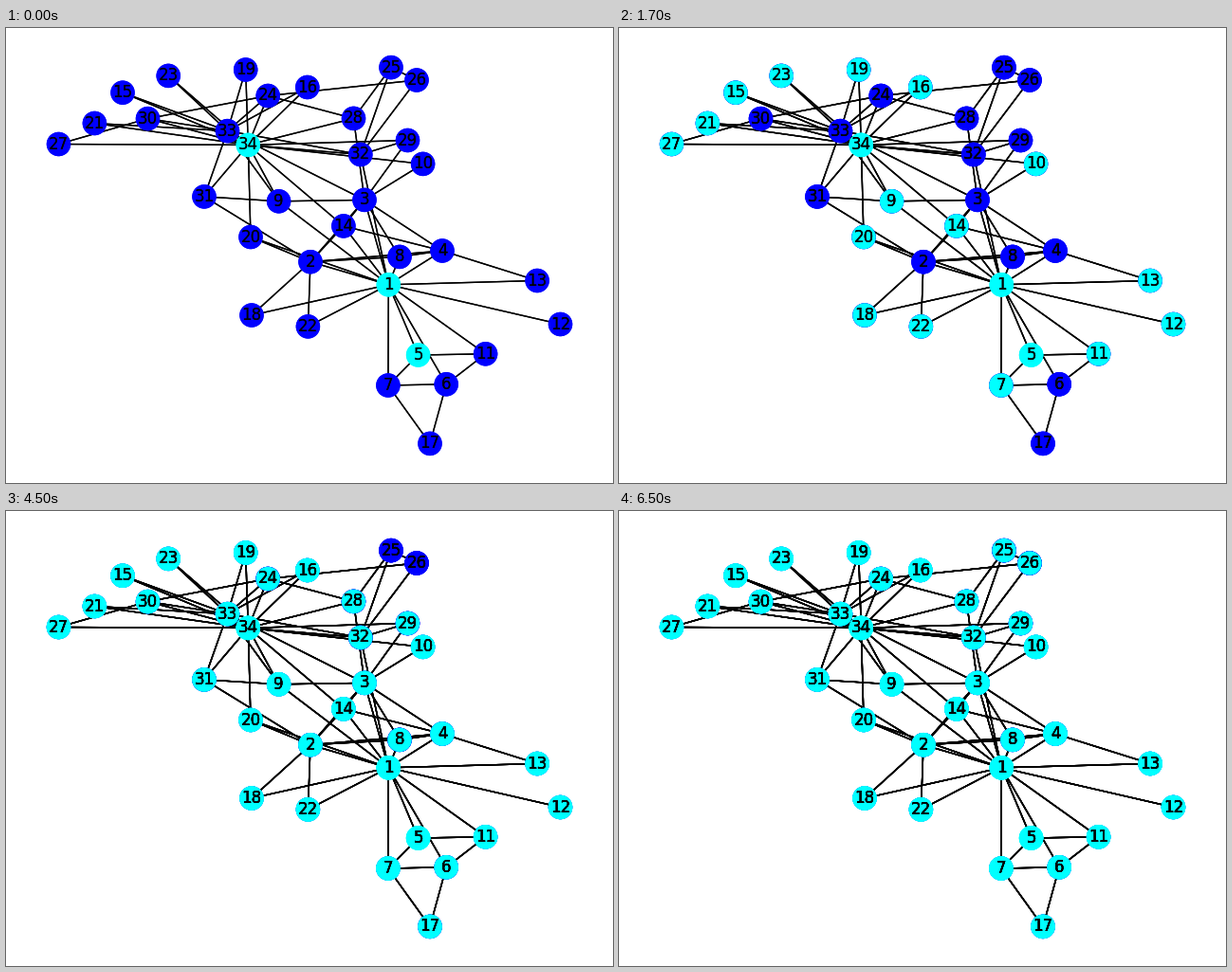
A matplotlib script for the animation above (8000 ms loop, 640x480 px).

```python
import matplotlib.pyplot as plt
from matplotlib.animation import FuncAnimation
from matplotlib.collections import LineCollection

W, H, DPI = 640, 480, 100
INTERVAL = 500
FRAMES = 16
STEPS = 4
THRESHOLD = 0.4
SEEDS = {1, 5, 34}

# One point per node, numbered from 1
POINTS = [
    (403.3, 270.8), (321, 246.7), (378, 181.4), (460, 235), (434.6, 345),
    (464.2, 375.8), (402.9, 377), (415, 241.4), (287.6, 182.8), (439.6, 143.4),
    (505.6, 343.8), (584.5, 312.5), (560.1, 266.5), (355.9, 208.9), (123, 68.2),
    (317.8, 62.5), (447, 438.4), (259, 303), (252.7, 44), (258, 220.5),
    (93.4, 100.5), (318.4, 314.9), (171.2, 50.4), (276.2, 71.5), (406, 41.6),
    (433, 55), (55.5, 122.5), (366.5, 95.4), (423.5, 118.5), (149.5, 95.6),
    (209, 177.9), (373.8, 133.5), (233.5, 108.6), (255.3, 123.4)]
NODES = range(1, len(POINTS) + 1)

LINKS = {
    1: [*range(2, 10), *range(11, 15), 18, 20, 22, 32],
    2: [3, 4, 8, 14, 18, 20, 22, 31],
    3: [4, *range(8, 11), 14, 28, 29],
    4: [8, 13, 14], 5: [7, 11], 6: [7, 11, 17], 7: [17], 9: [31],
    24: [26, 28, 30], 25: [26, 28, 32], 26: [32], 27: [30], 29: [32],
    33: [3, 9, 15, 16, 19, 21, 23, 24, *range(30, 33)],
    34: [9, 10, *range(14, 17), *range(19, 22), 23, 24, *range(27, 34)],
}
EDGES = [(a, b) for a, ends in LINKS.items() for b in ends]
NEIGHBOURS = {n: {a + b - n for a, b in EDGES if n in (a, b)} for n in NODES}


def spread(active):
    """Activate each node with a large enough share of active neighbours."""
    return active | {n for n in NODES
                     if len(NEIGHBOURS[n] & active) >= THRESHOLD * len(NEIGHBOURS[n])}


fig = plt.figure(figsize=(W / DPI, H / DPI), dpi=DPI, facecolor="white")
ax = fig.add_axes([0, 0, 1, 1])
ax.set_xlim(0, W)
ax.set_ylim(H, 0)
ax.axis("off")


def draw_graph(active):
    segments = [(POINTS[a - 1], POINTS[b - 1]) for a, b in EDGES]
    edges = LineCollection(segments, colors="black", linewidths=1, zorder=1)
    ax.add_collection(edges, autolim=False)
    colors = ["cyan" if n in active else "blue" for n in NODES]
    nodes = ax.scatter(*zip(*POINTS), s=300, c=colors, linewidths=1, zorder=2)
    labels = [ax.text(x, y, str(n), size=12, family="DejaVu Sans",
                      ha="center", va="center", zorder=3)
              for n, (x, y) in zip(NODES, POINTS)]
    return [edges, nodes, *labels]


# Each step is painted over the earlier ones, so strokes grow darker;
# the opening state is painted twice.
states = [SEEDS, SEEDS]
for _ in range(STEPS):
    states.append(spread(states[-1]))
layers = [draw_graph(active) for active in states]


def update(frame):
    step = (frame + 3) // 4
    for i, layer in enumerate(layers):
        for artist in layer:
            artist.set_visible(i <= step + 1)
    return [artist for layer in layers for artist in layer]


anim = FuncAnimation(fig, update, frames=FRAMES, interval=INTERVAL,
                     repeat=True, repeat_delay=0, blit=False)
plt.show()
```
